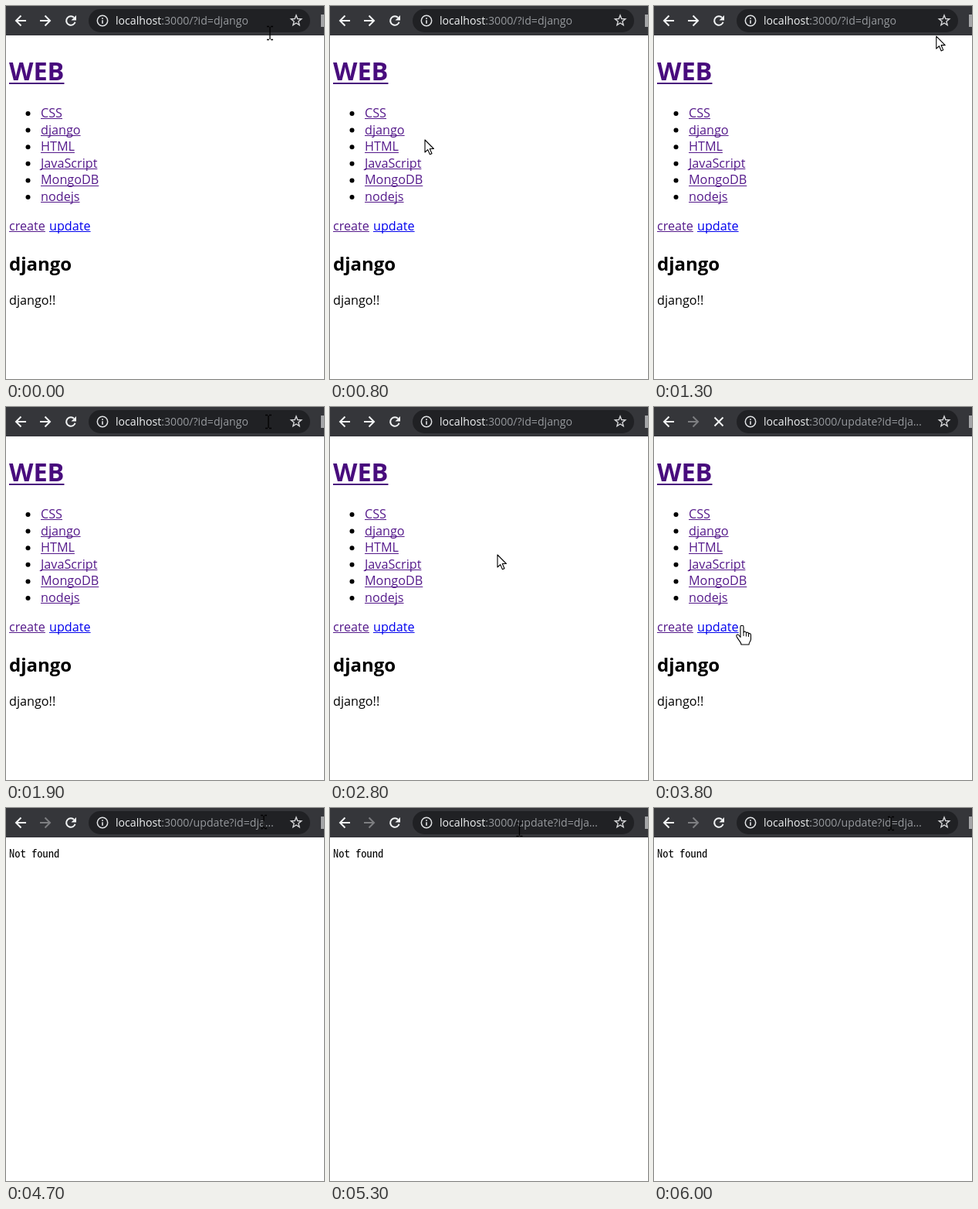
An HTML page with a canvas that plays this animation: 412 by 482 pixels, repeating every 6.1 s.

```html
<!DOCTYPE html>
<html lang="en">
<head>
<meta charset="utf-8">
<title>Topic page</title>
<style>
html, body { margin: 0; width: 100%; height: 100%; overflow: hidden; background: #fff; }
canvas { display: block; width: 412px; height: 482px; }
</style>
</head>
<body>
<canvas id="stage" width="412" height="482"></canvas>
<script>
const ctx = document.getElementById('stage').getContext('2d');
const LOOP = 6100, STEP = 100;
const CLICK = 3700, LOADED = 3900, LEAVE = 4300;
const SANS = '"Open Sans", "Noto Sans", sans-serif';
const MONO = '"Noto Sans Mono CJK KR", "Noto Sans Mono CJK JP", monospace';
const VISITED = '#551a8b', FRESH = '#0000ee';
const topics = ['CSS', 'django', 'HTML', 'JavaScript', 'MongoDB', 'nodejs'];
const topicY = i => 144 + i * 21.6;

// Pointer path: time, x, y
const path = [
  [0, 342, 35], [150, 398, 62], [400, 230, 175], [600, 118, 192], [700, 118, 192],
  [800, 123, 173], [950, 46, 150], [1250, 398, 22], [1500, 88, 187],
  [1750, 398, 40], [1900, 340, 19], [2300, 118, 190], [2550, 369, 20],
  [2800, 217, 191], [2900, 217, 191], [3150, 398, 60], [3400, 200, 340],
  [3600, 114, 283], [4200, 114, 283], [4500, 370, 14], [4700, 334, 18],
  [4900, 16, 24], [5200, 369, 18], [5450, 18, 46], [5700, 369, 16],
  [5850, 134, 20], [6000, 307, 20], [6100, 307, 20]
];

function pointerAt(t) {
  const i = path.findIndex((p, k) => k && t <= p[0]);
  const [t0, x0, y0] = path[i - 1], [t1, x1, y1] = path[i];
  const u = (t - t0) / (t1 - t0), e = u * u * (3 - 2 * u);
  return [x0 + (x1 - x0) * e, y0 + (y1 - y0) * e];
}

function text(str, x, y, size, color = '#000', weight = 400, family = SANS) {
  ctx.font = `${weight} ${size}px ${family}`;
  ctx.fillStyle = color;
  ctx.fillText(str, x, y);
  return ctx.measureText(str).width;
}

function link(str, x, y, size = 16.2, color = VISITED, weight = 400) {
  const w = text(str, x, y, size, color, weight);
  const thick = size > 20 ? 2 : 1;
  ctx.fillRect(x, Math.round(y + size * 0.09), w, thick);
}

function disc(x, y, r, color) {
  ctx.fillStyle = color;
  ctx.beginPath();
  ctx.arc(x, y, r, 0, Math.PI * 2);
  ctx.fill();
}

function stroke(d, color, width = 2) {
  ctx.strokeStyle = color;
  ctx.lineWidth = width;
  ctx.stroke(new Path2D(d));
}

function at(x, y, draw) {
  ctx.save();
  ctx.translate(x, y);
  draw();
  ctx.restore();
}

function star() {
  let d = '';
  for (let i = 0; i < 10; i++) {
    const a = i * Math.PI / 5 - Math.PI / 2, r = i % 2 ? 3 : 7;
    d += `${i ? 'L' : 'M'}${r * Math.cos(a)} ${r * Math.sin(a)}`;
  }
  stroke(d + 'Z', '#d5d6d8', 1.4);
}

function reload() {
  ctx.strokeStyle = ctx.fillStyle = '#f1f3f4';
  ctx.lineWidth = 2;
  ctx.beginPath();
  ctx.arc(0, 0, 5.8, 0.3, Math.PI * 1.75);
  ctx.stroke();
  ctx.fill(new Path2D('M7 -7V-.5H.5Z'));
}

function toolbar(t) {
  const moved = t >= CLICK;
  ctx.fillStyle = '#35363a';
  ctx.fillRect(0, 0, 412, 38);
  ctx.fillStyle = '#202124';
  ctx.beginPath();
  ctx.roundRect(107, 4, 287, 30, 15);
  ctx.fill();
  const arrow = 'M7 0H-6M.5 -6.5L-6 0L.5 6.5';
  at(19, 19, () => stroke(arrow, '#f1f3f4'));
  at(51, 19, () => {
    ctx.scale(-1, 1);
    stroke(arrow, moved ? '#7d7e81' : '#f1f3f4');
  });
  at(84, 19, () => moved && t < LOADED
    ? stroke('M-5.5 -5.5L5.5 5.5M5.5 -5.5L-5.5 5.5', '#f1f3f4') : reload());
  at(125, 19, () => {
    stroke('M-6.7 0a6.7 6.7 0 1 0 13.4 0a6.7 6.7 0 1 0 -13.4 0', '#e1e3e5', 1.5);
    stroke('M0 -3.7V-2M0 -.7V3.7', '#e1e3e5', 1.6);
  });
  const w = text('localhost', 142, 24, 14.15, '#f1f3f4');
  text(moved ? ':3000/update?id=dja…' : ':3000/?id=django', 142 + w, 24, 14.15, '#96999d');
  at(376, 19, star);
  ctx.fillStyle = '#a5a6a8';
  ctx.fillRect(408, 11, 4, 16);
}

function topicPage() {
  link('WEB', 4, 96, 32.5, '#480c7d', 700);
  topics.forEach((name, i) => {
    disc(28.5, topicY(i) - 5, 3, '#000');
    link(name, 45, topicY(i));
  });
  link('create', 4, 290);
  link('update', 56, 290, 16.2, FRESH);
  text('django', 4, 342, 24, '#000', 700);
  text('django!!', 4, 386, 16.2);
}

function pointerKind(x, y, t) {
  const within = (l, r, top, bottom) => x >= l && x <= r && y >= top && y <= bottom;
  if (y < 38) return within(136, 362, 3, 37) ? 'beam' : 'arrow';
  if (t >= LEAVE) return within(4, 70, 52, 68) ? 'beam' : 'arrow';
  const onTopic = topics.some((name, i) =>
    within(45, 53 + name.length * 6.5, topicY(i) - 15, topicY(i) + 4));
  return onTopic || within(4, 116, 275, 294) ? 'hand' : 'arrow';
}

const pointers = {
  beam() {
    stroke('M-4 -8.5H-1M1 -8.5H4M0 -8V8M-4 8.5H-1M1 8.5H4', '#000', 1.3);
  },
  arrow() {
    const shape = new Path2D('M0 0V16L3.7 12.6L6.4 18.8L9 17.7L6.3 11.5H11.4Z');
    fillOutlined(shape);
  },
  hand() {
    const shape = new Path2D(
      'M-2 1C-2 -1.3 2 -1.3 2 1V8C3 6.6 5.3 7 5.4 8.8C6.6 7.6 8.5 8.4 8.6 10' +
      'C10 9 11.5 10 11.5 11.7V17C11.5 20 9 20.5 9 24H-1C-1 21 -5 18 -7 13.5' +
      'C-8 11 -5.5 10.2 -4 12L-2 14.5Z');
    fillOutlined(shape);
    stroke('M2 8V13M5.4 9V13.5M8.6 10V14', '#000', 1);
  }
};

function fillOutlined(shape) {
  ctx.lineJoin = 'round';
  ctx.fillStyle = '#fff';
  ctx.strokeStyle = '#000';
  ctx.lineWidth = 1.1;
  ctx.fill(shape);
  ctx.stroke(shape);
}

function render(now) {
  const t = Math.floor(now % LOOP / STEP) * STEP;
  ctx.fillStyle = '#fff';
  ctx.fillRect(0, 0, 412, 482);
  toolbar(t);
  if (t < LOADED) topicPage();
  else text('Not found', 4, 64, 14.5, '#000', 400, MONO);
  const [x, y] = pointerAt(t);
  at(x, y, pointers[pointerKind(x, y, t)]);
}

const start = performance.now();
function tick() {
  render(performance.now() - start);
  requestAnimationFrame(tick);
}
tick();
</script>
</body>
</html>
```
